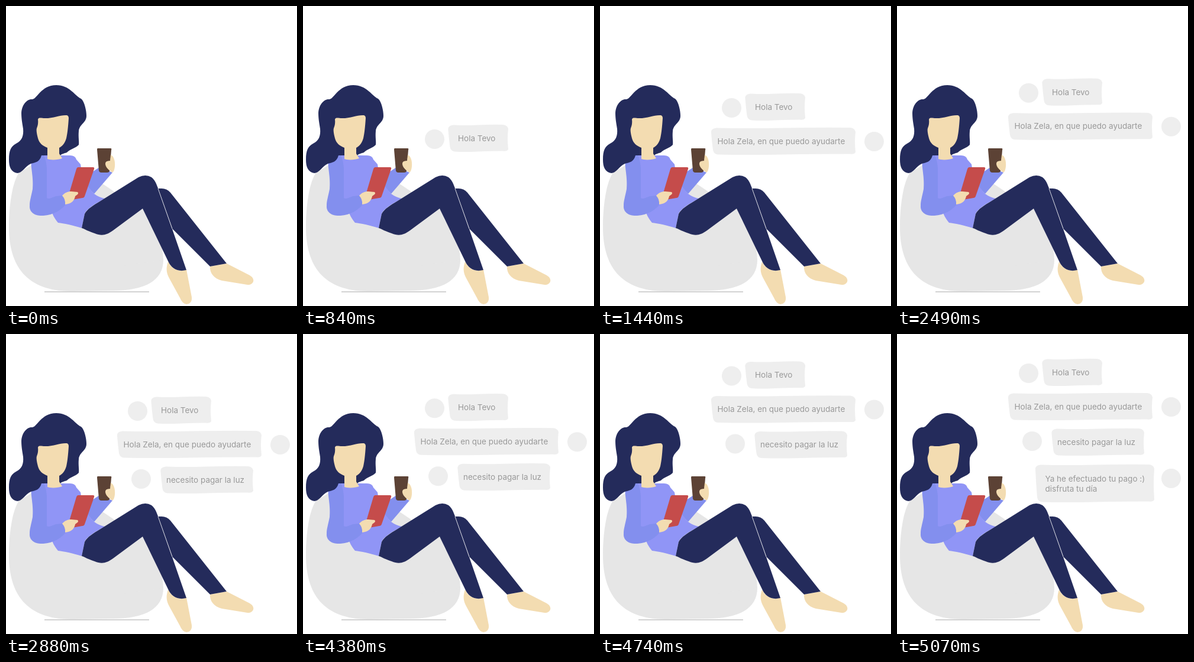
An HTML page that plays this animation: 492 by 508 pixels, repeating every 8 s.

```html
<!DOCTYPE html>
<html lang="es">
<head>
<meta charset="utf-8">
<title>Chat</title>
<style>
  html, body { margin: 0; width: 100%; height: 100%; overflow: hidden; background: #fff; }
  svg { display: block; width: 492px; height: 508px; }
  .skin { fill: #f3dcb1; }
  .navy { fill: #242b5b; }
  .sleeve { fill: #838fee; }
  .shirt { fill: #9095f6; }
  .bubble, circle { fill: #eee; }
  text { font: 13.5px Inter, Arial, sans-serif; fill: #999; }
</style>
</head>
<body>
<svg viewBox="0 0 492 508">
  <!-- bean bag -->
  <path fill="#e6e6e6" d="M22 282C10 300 5 340 5 375C5 440 35 483 110 483L180 482C235 482 266 465 266 430C266 385 240 350 160 299L60 260Z"/>
  <path fill="#e6e6e6" d="M180 360L231 340L266 430L200 440Z"/>
  <path stroke="#d3d3d3" stroke-width="2" d="M65 484H242"/>
  <!-- body -->
  <path class="sleeve" d="M146 281L158 273L180 282L149 318L132 300Z"/>
  <path class="shirt" d="M60 253H108Q117 253 119 260L126 268C128 285 137 306 149 318Q157 324 167 326C150 335 135 345 133 352L128 376C112 371 98 368 88 367C82 360 78 352 77 346L60 330Z"/>
  <path class="sleeve" d="M43 264C41 270 47 290 45 310C42 325 40 330 40 338C39 350 50 356 63 355C80 354 94 345 100 337C101 330 100 324 95 321L85 322C78 324 72 328 69 325V275Q68 260 64 253H58Z"/>
  <!-- head -->
  <path class="navy" d="M43 158C52 160 58 134 85 134C108 134 116 152 127 157C133 162 136 178 136 186C136 198 124 200 123 212C122 222 124 230 123 235C119 240 107 243 103 248C97 250 93 251 92 253H60C57 264 50 265 42 267C32 272 27 283 19 283C8 281 5 272 5 260C5 245 8 238 17 233C27 228 30 220 29 208C27 196 26 190 26 181C27 165 37 158 43 158Z"/>
  <path class="skin" d="M54 192C55 188 60 190 66 190C82 190 92 184 103 185Q106 186 106 190C105 205 104 215 102 224C99 234 94 238 90 240V250L95 258C88 261 74 261 70 259V240C62 237 56 232 54 224C52 216 51 210 52 207Q55 200 54 192Z"/>
  <!-- tablet and cup -->
  <path fill="#c54c4b" d="M122 273H147Q150 273 149 276L133 322Q132 325 129 325L112 328Q104 328 106 320L119 276Q120 273 122 273Z"/>
  <path class="skin" d="M95 321C100 316 104 314 110 314L121 315Q123 317 121 319L117 322C116 328 112 335 100 336Q101 328 95 321Z"/>
  <path fill="#5c4235" d="M155 241H177Q179 241 178 244L175 280Q174 282 171 282H161Q158 282 157 279L154 243Q154 241 155 241Z"/>
  <path class="skin" d="M177 252C182 254 185 262 184 272Q183 280 180 282C174 278 169 274 168 268Q167 262 176 262Z"/>
  <!-- legs -->
  <path class="skin" d="M345 441L373 436L412 456Q420 461 418 467Q415 473 408 472L365 465C352 462 344 452 345 441Z"/>
  <path class="skin" d="M274 433Q280 446 293 448Q300 449 305 446L314 493Q315 504 305 505Q298 504 294 494L276 461C270 450 271 442 274 433Z"/>
  <path class="navy" d="M257 309H263Q272 309 278 316L373 436L345 441L281 377Z"/>
  <path class="navy" d="M128 376L133 352C137 344 148 337 160 330L224 290Q236 284 246 290Q251 294 254 301L258 311L305 447C290 451 280 444 275 434L231 343L181 380C170 388 162 390 150 385C140 382 134 378 128 376Z"/>
  <path stroke="#fff" stroke-width=".8" d="M257 309L281 377"/>
  <g id="chat"></g>
</svg>
<script>
const LOOP = 8000;
const chat = document.getElementById('chat');

// Geometry is given for the final scroll position; pop is [start, end] in ms.
const messages = [
  { x: 245.5, y: 42, w: 101.5, h: 45.5, avatar: [222.5, 66.5], textX: 262, baseline: 70, lines: ['Hola Tevo'], pop: [0, 270] },
  { x: 188, y: 100, w: 244, h: 45.5, avatar: [463.5, 123.5], textX: 198.5, baseline: 127.5, lines: ['Hola Zela, en que puedo ayudarte'], pop: [1170, 1440] },
  { x: 261.5, y: 160, w: 156.5, h: 45.5, avatar: [228.5, 181.5], textX: 271, baseline: 187.5, lines: ['necesito pagar la luz'], pop: [2610, 2880] },
  { x: 234, y: 221, w: 201, h: 63.5, avatar: [463.5, 244.5], textX: 250.5, baseline: 250, lines: ['Ya he efectuado tu pago :)', 'disfruta tu día'], pop: [4770, 5070] }
];

// [start, end, offset before, offset after]
const scrolls = [[810, 1170, 164, 106], [2310, 2610, 106, 64], [4350, 4770, 64, 0]];

const progress = (t, start, end) => Math.min(1, Math.max(0, (t - start) / (end - start)));

function backOut(p) {
  const c = 1.15, q = p - 1;
  return 1 + (c + 1) * q ** 3 + c * q ** 2;
}

// Slightly uneven hand-cut rectangle
const bubblePath = (w, h) =>
  `M0 9C-1 3 4 .5 11 .5Q${w * .25} 1.5 ${w * .5} .5T${w - 9} 0Q${w - 1} 1 ${w} 7` +
  `Q${w - 2} ${h / 2} ${w} ${h - 4}Q${w - 2} ${h} ${w - 9} ${h - 1}` +
  `Q${w * .75} ${h - 1} ${w * .5} ${h}T11 ${h}Q4 ${h - 1} 3 ${h - 8}Q1 ${h / 2} 0 9Z`;

function add(parent, tag, attrs, content = '') {
  const el = document.createElementNS('http://www.w3.org/2000/svg', tag);
  for (const key in attrs) el.setAttribute(key, attrs[key]);
  el.textContent = content;
  return parent.appendChild(el);
}

for (const m of messages) {
  m.group = add(chat, 'g', {});
  m.dot = add(m.group, 'circle', { cx: m.avatar[0], cy: m.avatar[1] });
  m.box = add(m.group, 'g', {});
  add(m.box, 'path', { class: 'bubble', d: bubblePath(m.w, m.h), transform: `translate(${m.x} ${m.y})` });
  m.lines.forEach((line, i) => add(m.box, 'text', { x: m.textX, y: m.baseline + 17 * i }, line));
  m.originX = m.avatar[0] < m.x ? m.x : m.x + m.w;
  m.originY = m.y + m.h / 2;
}

function draw(now) {
  const t = now % LOOP;
  let offset = scrolls[0][2];
  for (const [start, end, from, to] of scrolls)
    if (t >= start) offset = from + (to - from) * progress(t, start, end);
  chat.setAttribute('transform', `translate(0 ${offset})`);

  for (const m of messages) {
    const p = progress(t, ...m.pop), s = Math.max(0, backOut(p));
    m.group.setAttribute('opacity', Math.min(1, p * 3));
    m.dot.setAttribute('r', 16.5 * s);
    m.box.setAttribute('transform',
      `translate(${m.originX} ${m.originY}) scale(${s}) translate(${-m.originX} ${-m.originY})`);
  }
}

const begin = performance.now();
function tick() {
  draw(performance.now() - begin);
  requestAnimationFrame(tick);
}
tick();
</script>
</body>
</html>
```
